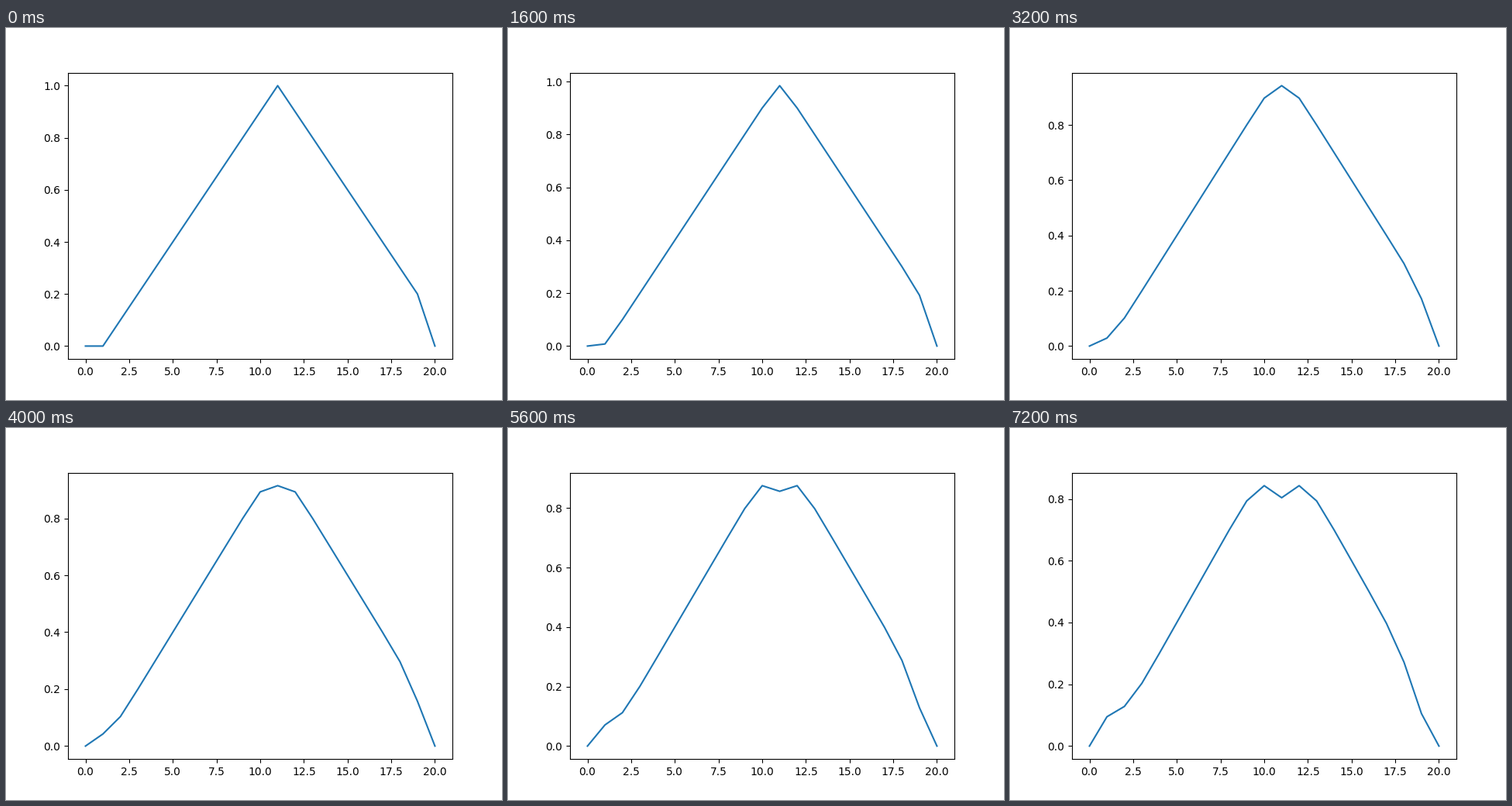
Animation, 640 px wide and 480 px high, one loop 8000 ms. Source, as a matplotlib script:

```python
import numpy as np
import matplotlib.pyplot as plt
from matplotlib.animation import FuncAnimation

FRAMES = 10
INTERVAL = 800
RATIO = 0.04  # squared Courant number


def curvature(y):
    """Second difference along the string; the ends stay fixed."""
    bend = np.zeros_like(y)
    bend[1:-1] = y[2:] - 2 * y[1:-1] + y[:-2]
    return bend


def simulate(start, steps):
    """Wave equation for a plucked string released from rest."""
    shapes = [start, start + 0.5 * RATIO * curvature(start)]
    while len(shapes) < steps:
        prev, cur = shapes[-2:]
        shapes.append(2 * cur - prev + RATIO * curvature(cur))
    return shapes


x = np.arange(21)
pluck = 1 - 0.1 * np.abs(x - 11)
pluck[[0, -1]] = 0
pluck[1] = 0
shapes = simulate(pluck, FRAMES)

fig, ax = plt.subplots(figsize=(6.4, 4.8), dpi=100)
line, = ax.plot(x, shapes[0])


def update(frame):
    line.set_ydata(shapes[frame])
    ax.relim()
    ax.autoscale_view()
    return line,


anim = FuncAnimation(fig, update, frames=FRAMES, interval=INTERVAL,
                     repeat=True, repeat_delay=0, blit=False)
plt.show()
```
